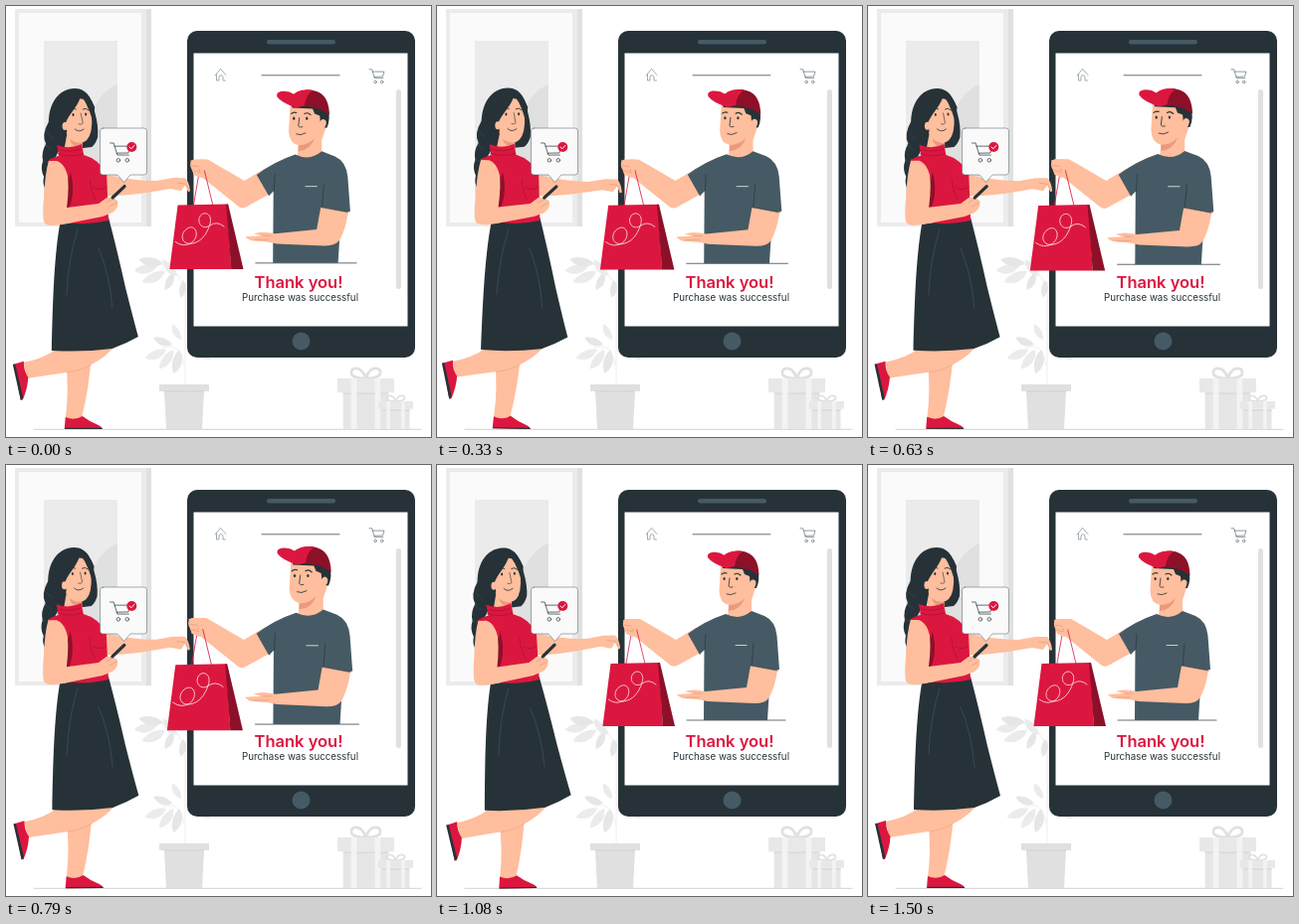
An HTML page with a canvas that plays this animation: 427x434 px, repeating every 1.54 s.

```html
<!DOCTYPE html>
<html lang="en">
<head>
<meta charset="utf-8">
<title>Thank you</title>
<style>
html, body { margin: 0; width: 100%; height: 100%; overflow: hidden; background: #fff; }
canvas { display: block; width: 427px; height: 434px; }
</style>
</head>
<body>
<canvas id="stage" width="427" height="434"></canvas>
<script>
const ctx = document.getElementById('stage').getContext('2d');
const RED = '#dc173f', DEEP = '#8d1029', INK = '#263238', SLATE = '#455a64', SKIN = '#ffbe9d';
const LOOP = 1540, STEP = 1000 / 24;

const fill = (d, color) => { ctx.fillStyle = color; ctx.fill(new Path2D(d)); };
const line = (d, color, width = 0.7) => {
  ctx.strokeStyle = color;
  ctx.lineWidth = width;
  ctx.lineCap = ctx.lineJoin = 'round';
  ctx.stroke(new Path2D(d));
};
const rect = (x, y, w, h, color, r = 0) => {
  ctx.fillStyle = color;
  ctx.beginPath();
  ctx.roundRect(x, y, w, h, r);
  ctx.fill();
};
const oval = (x, y, rx, ry, color, turn = 0) => {
  ctx.fillStyle = color;
  ctx.beginPath();
  ctx.ellipse(x, y, rx, ry, turn, 0, 7);
  ctx.fill();
};
const text = (s, x, y, font, color) => {
  ctx.font = font;
  ctx.fillStyle = color;
  ctx.textAlign = 'center';
  ctx.fillText(s, x, y);
};
function around(x, y, angle, scale, draw) {
  ctx.save();
  ctx.translate(x, y);
  ctx.rotate(angle);
  ctx.scale(scale, scale);
  ctx.translate(-x, -y);
  draw();
  ctx.restore();
}

// Linear interpolation through [time, value] keys, held at both ends.
function track(keys, t) {
  const i = keys.findIndex(k => k[0] > t);
  if (i < 0) return keys[keys.length - 1][1];
  const [t0, a] = keys[i - 1], [t1, b] = keys[i];
  return a + (b - a) * (t - t0) / (t1 - t0);
}
const PULSE = [[0, 1], [150, 1.1], [450, 1], [600, 1], [750, 1.1], [900, 1]];
const SWAY = [[0, 0], [375, 1], [1125, -1], [1500, 0]];

function cart(x, y, k, color, width) {
  ctx.save();
  ctx.translate(x, y);
  ctx.scale(k, k);
  line('M0 0H3.5L7 11.5H18M4.3 3H19.5L17.5 9.5L6.4 9.7', color, width / k);
  for (const cx of [8, 16.5]) {
    line(`M${cx + 1.7} 16.5a1.7 1.7 0 1 1 -3.4 0a1.7 1.7 0 1 1 3.4 0`, color, width / k);
  }
  ctx.restore();
}

function leaf(x, y, length, angle, color) {
  ctx.save();
  ctx.translate(x, y);
  ctx.rotate(angle);
  ctx.scale(length, length);
  fill('M0 0C.3 -.3 .7 -.28 1 0C.7 .2 .3 .2 0 0', color);
  ctx.restore();
}

function room() {
  rect(9, 3, 137, 219, '#e0e0e0');
  rect(9, 3, 132, 219, '#ebebeb');
  rect(13, 7, 123, 211, '#fafafa');
  rect(38, 35, 74, 156, '#ebebeb');
  fill('M38 148C51 132 70 124 88 103Q98 84 112 79V191H38Z', '#e0e0e0');
  line('M28 426.3H417', '#b0b4b6', 0.6);

  line('M180 278V381M179 284C173 266 162 258 148 260M179 362C177 346 170 340 158 344', '#ebebeb', 0.8);
  const leaves = [
    [152, 262, 24, 2.95], [158, 259, 25, 3.3], [160, 267, 26, 2.7], [168, 268, 20, 2],
    [172, 272, 22, 4], [178, 276, 18, 1.7], [161, 346, 23, 2.75], [167, 341, 20, 3.5],
    [168, 346, 24, 2.2], [174, 346, 25, 1.8], [176, 336, 18, 4.2], [190, 346, 18, 0.6]
  ];
  leaves.forEach(([x, y, n, a], i) => leaf(x, y, n, a, i % 2 ? '#e6e6e6' : '#ebebeb'));
  rect(154, 381, 50, 7, '#e0e0e0');
  fill('M159 388H199L197 426H161Z', '#e0e0e0');
  rect(159, 387.5, 40, 1.2, '#d6d6d6');
}

function gift(x, y, w, h) {
  const lid = h * 0.28, mid = x + w / 2, side = w * 0.1, bow = h * 0.22;
  for (const s of [-1, 1]) {
    line(`M${mid} ${y}C${mid + s * w * .08} ${y - bow * 1.3} ${mid + s * w * .3} ${y - bow} ${mid + s * w * .25} ${y - bow * .35}Q${mid + s * w * .2} ${y} ${mid} ${y}`, '#e0e0e0', w * 0.05);
  }
  rect(x + side, y + lid, w - side * 2, h - lid, '#e6e6e6');
  rect(x, y, w, lid, '#e8e8e8');
  rect(x + side, y + lid, w - side * 2, 2, '#dcdcdc');
  for (const p of [0.24, 0.66]) rect(x + w * p, y, w * 0.1, h, '#f3f3f3');
}

function tablet() {
  rect(182, 25, 229, 329, INK, 10);
  rect(188.5, 47.5, 215, 275, '#fff');
  rect(262, 34, 69, 4.5, SLATE, 2.2);
  oval(296.5, 337.5, 9, 9, SLATE);
  rect(392, 84, 5, 201, '#e0e0e0', 2.5);
  line('M210 70L215.5 63.5L221 69.5M211.5 69V75H214V71Q216 68 218 71V75H220.5', SLATE, 0.5);
  line('M257 69.8H335', INK, 0.7);
  cart(365, 63.8, 0.77, SLATE, 0.6);
  text('Thank you!', 294, 283.5, '600 16.5px Inter, sans-serif', RED);
  text('Purchase was successful', 295.5, 297.3, '400 9.75px Inter, sans-serif', INK);
}

function man() {
  line('M251 257H350', INK, 0.7);
  // Reaching arm
  fill('M260 164L240 176L211 159L204 155L190 155Q186 157 187 162L190 169L199 173L235 202Q239 204 243 201L272 185Z', SKIN);
  // Head
  fill('M285 101L283.5 127Q284 139 293 141L292 152Q303 160 316 151L316 136L321 121L319 104Z', SKIN);
  fill('M293 141Q303 141 309 134Q305 146 293 147Z', '#eb9a7c');
  fill('M286 99L305 102L322 105Q325 115 321 124L315 123L314 112L309 110L307 105L287 104Z', INK);
  oval(317, 120, 3.2, 4.6, SKIN, 0.3);
  fill('M286 97C289 88 302 84 311 88Q323 92 323.5 111Q313 103 296 102Z', DEEP);
  fill('M286 94C289 88 298 85 307 87Q300 92 299 102L291 104Q276 99 272 93Q271 89 276 88Q283 87 289 91Z', RED);
  oval(288.6, 114.5, 1.1, 1.5, INK);
  oval(301.3, 114.5, 1.1, 1.5, INK);
  line('M286 110Q288 108 291 109M299 110Q302 108 305 111', INK, 1.1);
  line('M294 114L293 122Q294 124 297 123M291 130Q295 132 300 129', INK, 0.8);
  // Resting arm and shirt
  fill('M290 150Q304 157 316 147L329 152Q340 157 341.5 172L344 206L335 208L332 257H268L268.5 186L264 191L252 170Q269 157 290 150Z', SLATE);
  line('M269 186L270 170M316 204L318 180', INK, 0.6);
  line('M300 181.5H311', '#e8ecee', 0.8);
  fill('M315 202L342 207Q339 226 333 235Q330 240 319 240L272 238L262 236L247 235Q242 233 241 231L257 230L249 228Q257 225 270 228L311 224Z', SKIN);
  line('M315 202L342 207', INK, 0.5);
  line('M250 234L264 234M258 230L266 230', '#d98a6c', 0.5);
  // Bag
  line('M196 165L190 200M200 163L209 200', RED, 0.8);
  fill('M174.5 200L223 199L227 263H166.5Z', RED);
  fill('M222 199H224L239 263H227Z', DEEP);
  line('M172 236Q180 242 188 237C196 231 193 220 186 222C177 225 176 238 187 238C197 237 203 229 206 219C209 210 202 205 197 210C192 217 199 225 206 220Q213 215 220 221', '#fff', 0.7);
  // Gripping fingers
  fill('M187 156L199 155Q207 157 209 162L203 166L195 165L201 170L197 173L190 170Z', SKIN);
  line('M188 161L195 162M190 166L197 168', '#d98a6c', 0.5);
}

function woman() {
  // Braid and back hair
  fill('M43 116Q35 130 40 139Q35 147 37 156Q34 164 38 172Q36 179 40 185Q46 180 45 172Q51 164 48 155L56 140L54 122Z', INK);
  line('M41 128L48 134M39 140L46 145M37 156L44 158', SLATE, 0.4);
  fill('M43 122C41 100 52 83 69 83C81 83 87 94 89 107Q93 121 92 132Q90 139 86 142L52 146Z', INK);

  // Legs
  fill('M50 346Q38 355 18 359L21 375L61 369Q92 363 108 344Z', SKIN);
  fill('M60 355L86 351Q84 384 76 416H60Q64 386 60 355Z', SKIN);
  line('M62 369Q76 367 86 361', '#e59c80', 0.5);
  fill('M8 361L18 358Q18 368 22.5 374Q22 385 17 397L15 397Z', RED);
  fill('M7 361L9.5 361L17.5 395L15 397Z', INK);
  fill('M60 414Q69 418 77 413Q85 419 93 422Q97 424 97 426H59Z', RED);
  rect(59.5, 424.8, 37.5, 1.2, INK, 0.6);

  // Extended arm
  fill('M96 169Q126 176 151 176L168 173L180 173Q184 177 185 186L183 187L180 180L176 186L165 184L147 187Q119 192 96 191Z', SKIN);
  line('M172 178L180 179L183 184', '#d98a6c', 0.5);

  // Neck and face
  fill('M62 124H76L77 146H58Z', SKIN);
  fill('M64 134Q70 139 76 137L76 144Q66 142 64 134Z', '#eb9a7c');
  fill('M60 101Q67 91 78 94Q85 98 86 111Q87 129 81 135Q76 140 68 136Q60 131 58 121Z', SKIN);
  fill('M76 87C73 101 65 106 60 117L61 127L55 133L46 128C43 107 53 90 69 86Z', INK);
  fill('M72 87Q81 95 87 116L89 102Q84 88 72 86Z', INK);
  oval(59, 121, 2.6, 4, SKIN);
  oval(67.3, 109.5, 1, 1.5, INK);
  oval(80, 109, 1, 1.5, INK);
  line('M64 105Q66 102 70 104M77 104Q80 102 83 105', INK, 0.9);
  line('M75 108L77 118Q76 120 73 119', INK, 0.6);
  line('M69 124Q73 128 78 124', INK, 0.8);

  // Skirt
  fill('M54 220L103 213Q111 243 120 283Q127 311 133 333Q121 340 107 345Q76 349 46 347C47 305 48 255 54 220Z', INK);
  line('M72 225Q63 252 61 291M93 244Q104 269 107 304', SLATE, 0.6);

  // Top and bent arm
  fill('M51 140Q64 145 76 139L78 150Q93 154 101 169L103 216Q78 222 56 217L60 190L47 170L43 156Q48 152 53 151Z', RED);
  line('M52 149Q65 153 77 149M54 145Q65 148 75 144M88 183Q95 187 101 182M84 174Q85 188 90 195', DEEP, 0.5);
  fill('M61 158C70 176 68 198 61 207Z', DEEP);
  fill('M43 155Q55 153 61 163Q64 181 61 203L93 199L101 193L107 193L112 196Q114 203 107 208L97 212L62 219Q43 223 39 219Q36 215 38 193Q39 168 43 155Z', SKIN);
  fill('M42 156Q45 153 53 151L67 154L63 176Q60 159 51 156Z', RED);
  line('M107 193L119 181.5', INK, 3.2);
  line('M101 198L107 194M104 202L111 198', '#d98a6c', 0.5);
}

function bubble() {
  const d = 'M97.5 123H138.5Q141.5 123 141.5 126V167Q141.5 170 138.5 170H125L118.5 177.5L112 170H97.5Q94.5 170 94.5 167V126Q94.5 123 97.5 123Z';
  fill(d, '#fafafa');
  line(d, SLATE, 0.5);
  cart(104.5, 138, 1.05, INK, 0.7);
  oval(126.3, 142, 5, 5, RED);
  line('M124 142L125.8 143.8L128.8 140.5', '#fff', 1);
}

function draw(now) {
  const elapsed = now % LOOP;
  const t = Math.floor((elapsed + 5) / STEP) * STEP % (STEP * 37) + 34;
  ctx.fillStyle = '#fff';
  ctx.fillRect(0, 0, 427, 434);
  room();
  gift(333, 375, 57, 51);
  gift(374, 398, 35, 28);
  tablet();
  around(260, 175, 0, track(PULSE, t), man);
  around(97, 235, track(SWAY, t) * Math.PI / 180, 1, woman);
  bubble();
}

const start = performance.now();
function tick() {
  draw(performance.now() - start);
  requestAnimationFrame(tick);
}
tick();
</script>
</body>
</html>
```
